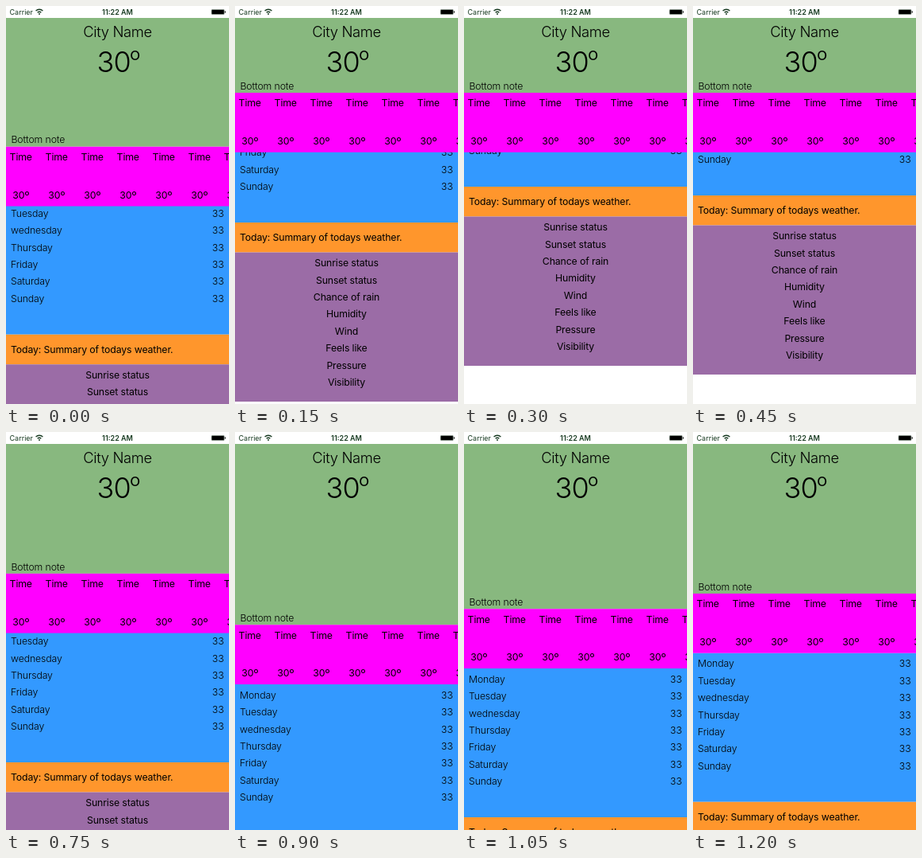
Recreate the animation shown at these times as an HTML page. Size 281 by 500 pixels, loop 1.35 s.

```html
<!DOCTYPE html>
<html lang="en">
<head>
<meta charset="utf-8">
<title>Weather scroll</title>
<style>
  html, body { margin: 0; width: 100%; height: 100%; overflow: hidden; background: #fff; }
  svg { display: block; width: 281px; height: 500px; }
  text { font: 400 12.3px Inter, "Open Sans", sans-serif; letter-spacing: -.011em; fill: #000; }
  .light { font-weight: 300; }
  .city { font-size: 18.4px; font-weight: 300; letter-spacing: -.018em; }
  .degrees { font-size: 36px; font-weight: 300; letter-spacing: -.02em; }
  .ordinal { font-size: 28px; }
  .status { font-size: 9px; letter-spacing: 0; fill: #173a20; }
  .clock { font-weight: 600; }
  .mid { text-anchor: middle; }
  .end { text-anchor: end; }
</style>
</head>
<body>
<svg id="stage" viewBox="0 0 281 500"></svg>
<script>
const stage = document.getElementById('stage');
const WIDTH = 281, CENTER = 140.5;
const ROW = 21.4, COLUMN = 45;
const STATUS_HEIGHT = 15, MIN_HEADER = 109, REST_HEADER = 203, REST_SUMMARY = 464.75;
const COLLAPSE_RATE = 0.505;

const STEP = 150;
// Top of the summary bar at each step of the drag and its bounces.
const SUMMARY_TOPS = [412.75, 272, 227, 238, 299.25, 415, 504, 484, 464.75];

function add(parent, tag, attrs, content) {
  const node = document.createElementNS('http://www.w3.org/2000/svg', tag);
  for (const name in attrs) node.setAttribute(name, attrs[name]);
  if (content !== undefined) node.textContent = content;
  parent.appendChild(node);
  return node;
}
const group = () => add(stage, 'g', {});
const box = (parent, y, height, fill) =>
  add(parent, 'rect', { x: 0, y, width: WIDTH, height, fill });
const label = (parent, x, y, content, style = '') =>
  add(parent, 'text', { x, y, class: style }, content);
const moveTo = (node, y) => node.setAttribute('transform', `translate(0 ${y})`);

// Scrolling content, placed relative to the summary bar
const content = group();
box(content, -187, 187, '#3399ff');
box(content, 0, 37.5, '#ff962c');
box(content, 37.5, 187.5, '#9b6ca6');
['Monday', 'Tuesday', 'wednesday', 'Thursday', 'Friday', 'Saturday', 'Sunday']
  .forEach((day, i) => {
    const y = -169.3 + i * ROW;
    label(content, 6, y, day, 'light');
    label(content, 274.5, y, '33', 'light end');
  });
label(content, 6, 23.1, 'Today: Summary of todays weather.');
['Sunrise status', 'Sunset status', 'Chance of rain', 'Humidity',
 'Wind', 'Feels like', 'Pressure', 'Visibility']
  .forEach((name, i) => label(content, CENTER, 55.2 + i * ROW, name, 'mid'));

// Header background, then the hourly strip attached to its lower edge
const header = box(stage, STATUS_HEIGHT, 1, '#88b87f');
const strip = group();
box(strip, 0, 74.75, '#ff00ff');
label(strip, 6.5, -4.3, 'Bottom note', 'light');
for (let i = 0; i < 7; i++) {
  const x = 18.75 + i * COLUMN;
  label(strip, x, 17.4, 'Time', 'mid');
  label(strip, x, 65.2, '30º', 'mid');
}
label(stage, CENTER, 39.3, 'City Name', 'city mid');
const degrees = label(stage, CENTER + 1, 82.5, '30', 'degrees mid');
add(degrees, 'tspan', { dx: -1, dy: -5.8, class: 'ordinal' }, 'º');

// Status bar
box(stage, 0, STATUS_HEIGHT, '#fff');
label(stage, 4.5, 10.8, 'Carrier', 'status');
label(stage, CENTER, 10.8, '11:22 AM', 'status clock mid');
for (const r of [3.2, 6.2]) {
  const d = r * 0.72;
  add(stage, 'path', {
    d: `M${42 - d} ${10.6 - d}A${r} ${r} 0 0 1 ${42 + d} ${10.6 - d}`,
    fill: 'none', stroke: '#173a20', 'stroke-width': 1.4
  });
}
add(stage, 'circle', { cx: 42, cy: 10, r: 1, fill: '#173a20' });
add(stage, 'rect', {
  x: 259, y: 4.5, width: 16, height: 6, rx: 1,
  fill: '#000', stroke: '#8a978c', 'stroke-width': .8
});
add(stage, 'rect', { x: 275.6, y: 6.3, width: 1.2, height: 2.4, rx: .6, fill: '#111' });

// The header follows an overscroll fully, then collapses more slowly.
function headerBottom(summaryTop) {
  const shift = summaryTop - REST_SUMMARY;
  return Math.max(MIN_HEADER, REST_HEADER + shift * (shift > 0 ? 1 : COLLAPSE_RATE));
}

function draw(time) {
  const summaryTop = SUMMARY_TOPS[Math.floor(time / STEP) % SUMMARY_TOPS.length];
  const bottom = headerBottom(summaryTop);
  moveTo(content, summaryTop);
  moveTo(strip, bottom);
  header.setAttribute('height', bottom - STATUS_HEIGHT);
}

let start;
function tick(now) {
  start ??= now;
  draw(now - start);
  requestAnimationFrame(tick);
}
draw(0);
requestAnimationFrame(tick);
</script>
</body>
</html>
```
